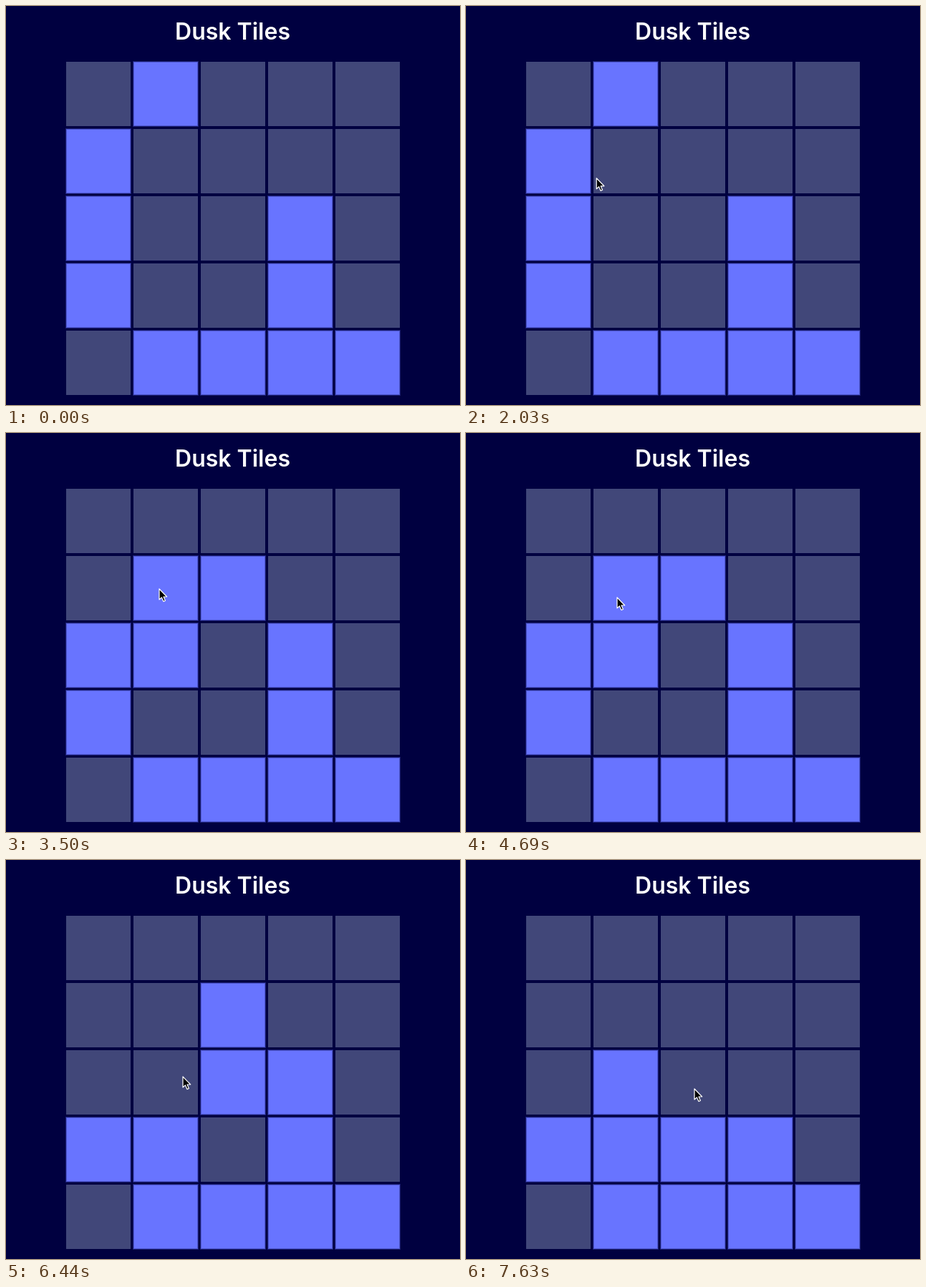
Animation of 634 by 558 pixels, one loop 8 s. Source, as an HTML page:

```html
<!DOCTYPE html>
<html lang="en">
<head>
<meta charset="utf-8">
<title>Dusk Tiles</title>
<style>
  html, body { margin: 0; width: 100%; height: 100%; overflow: hidden; background: #000040; }
  svg { display: block; }
  text { font: 600 32px Inter, sans-serif; fill: #fff; text-anchor: middle; }
  #board { stroke: #343aa0; stroke-width: 2; }
</style>
</head>
<body>
<svg width="634" height="558" viewBox="0 0 634 558">
  <rect width="634" height="558" fill="#000040"/>
  <text x="316.5" y="47">Dusk Tiles</text>
  <g id="board"></g>
  <g id="ring" fill="none">
    <circle r="21.7" stroke="#e4e5ee" stroke-width="3"/>
    <circle r="21.7" stroke="#20233f" stroke-width="1.2"/>
  </g>
  <path id="cursor" d="M1 1V16L4.4 12.9L6.9 18.6L9.4 17.5L7 12H11.7Z"
    fill="#000" stroke="#fff" stroke-width="1.2" stroke-linejoin="round"/>
</svg>
<script>
const LOOP = 8000, STEP = 70, FADE = 350;
const OFF = [65, 71, 121], ON = [104, 116, 255];
const start = ['01000', '10000', '10010', '10010', '01111'];

// Each press flips a tile and its direct neighbours.
const presses = [
  { row: 1, col: 1, ring: 2730, fade: 3150 },
  { row: 2, col: 1, ring: 6020, fade: 6090 },
  { row: 2, col: 2, ring: 7210, fade: 7280 }
];

// Pointer moves: begin, end, target x and y.
const origin = [-14, 342];
const moves = [
  [980, 1680, 146, 265],
  [1820, 2310, 213, 217],
  [4410, 4690, 210, 229],
  [4900, 5740, 293, 291],
  [5810, 6020, 246, 302],
  [6930, 7210, 318, 319]
];

const board = document.getElementById('board');
const ring = document.getElementById('ring');
const cursor = document.getElementById('cursor');

const clamp = v => Math.max(0, Math.min(1, v));
const smooth = v => v * v * (3 - 2 * v);
const glide = v => smooth(1 - (1 - v) ** 1.3);
const mix = (a, b, k) => a + (b - a) * k;
const place = (el, x, y) => el.setAttribute('transform', `translate(${x} ${y})`);

const tiles = [];
start.forEach((line, row) => [...line].forEach((lit, col) => {
  const el = document.createElementNS('http://www.w3.org/2000/svg', 'rect');
  const attrs = { x: 84 + col * 94, y: 78 + row * 94, width: 90, height: 90 };
  for (const name in attrs) el.setAttribute(name, attrs[name]);
  board.append(el);
  tiles.push({ el, row, col, lit: +lit });
}));

function glow(tile, t) {
  let level = tile.lit;
  for (const p of presses) {
    if (Math.abs(p.row - tile.row) + Math.abs(p.col - tile.col) > 1) continue;
    level = mix(level, 1 - level, smooth(clamp((t - p.fade) / FADE)));
  }
  return level;
}

function pointer(t) {
  let [x, y] = origin;
  for (const [from, to, tx, ty] of moves) {
    const k = glide(clamp((t - from) / (to - from)));
    x = mix(x, tx, k);
    y = mix(y, ty, k);
  }
  return [x, y];
}

function draw(time) {
  const t = Math.floor((time % LOOP) / STEP) * STEP;
  for (const tile of tiles) {
    const k = glow(tile, t);
    const rgb = OFF.map((v, i) => Math.round(mix(v, ON[i], k)));
    tile.el.setAttribute('fill', `rgb(${rgb})`);
    tile.el.setAttribute('stroke-opacity', k * 0.5); // soft rim on lit tiles
  }
  const [x, y] = pointer(t);
  place(cursor, x, y);
  place(ring, x + 0.5, y + 1.5);
  const pressed = presses.some(p => t >= p.ring && t < p.ring + STEP);
  ring.setAttribute('visibility', pressed ? 'visible' : 'hidden');
}

const begin = performance.now();
function tick() {
  draw(performance.now() - begin);
  requestAnimationFrame(tick);
}
tick();
</script>
</body>
</html>
```
